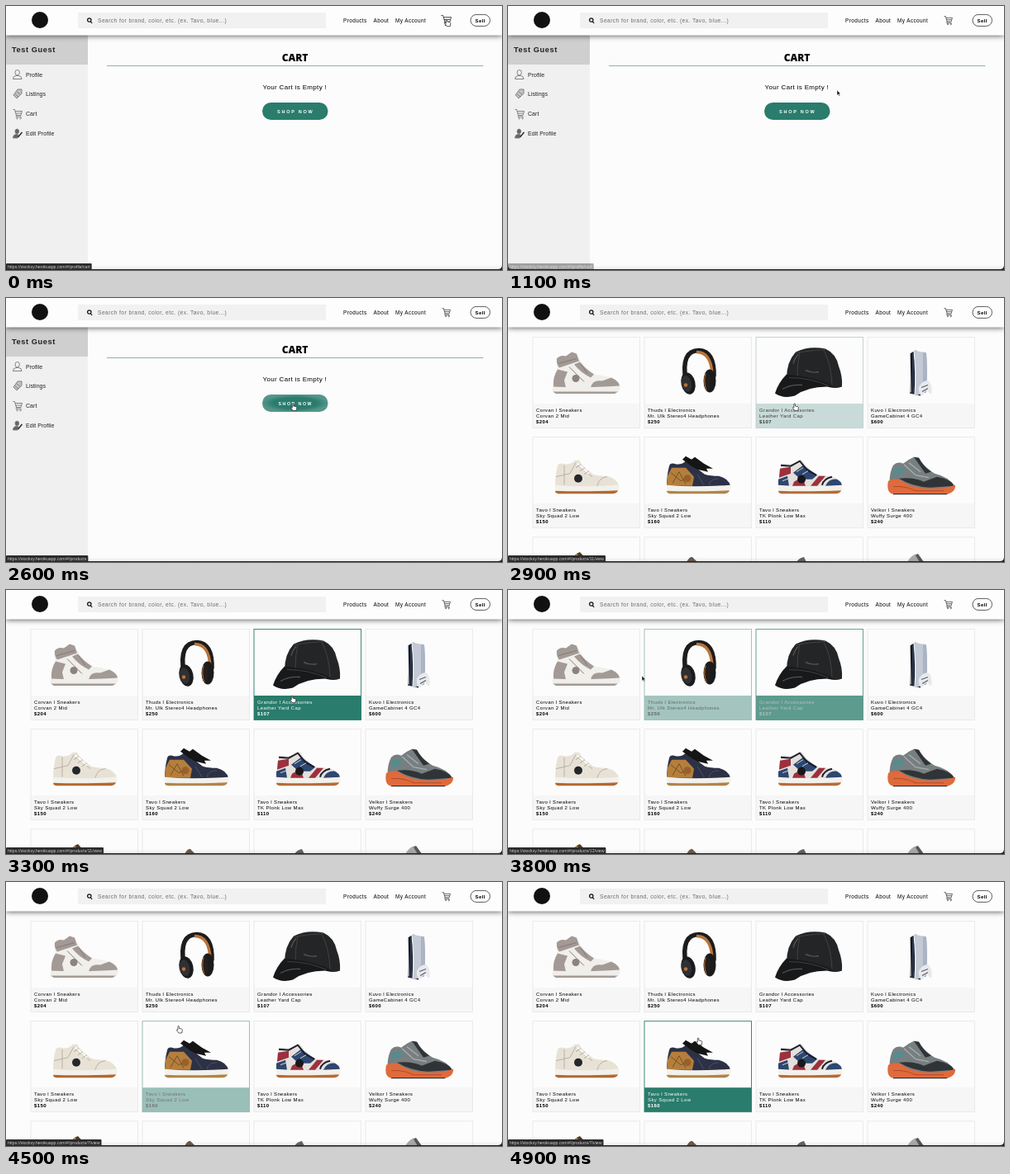
Write an HTML page that moves like this. It is 600 px wide and 320 px high and loops after 5000 ms.

```html
<!DOCTYPE html>
<html lang="en">
<head>
<meta charset="utf-8">
<title>Shop cart</title>
<style>
  html, body { margin: 0; width: 100%; height: 100%; overflow: hidden; background: #fcfcfc; }
  svg { display: block; width: 600px; height: 320px; font-family: "Liberation Sans", Arial, sans-serif; }
  .bold { font-weight: bold; }
  .search { font-size: 6.7px; letter-spacing: .43px; fill: #6c6c6c; }
  .nav { font-size: 6.4px; letter-spacing: .42px; }
  .user { font-size: 9.3px; letter-spacing: .55px; fill: #222; }
  .menu { font-size: 7px; letter-spacing: .04px; fill: #222; }
  .title { font: 800 12px "Open Sans", "Noto Sans", sans-serif; font-stretch: 75%; }
  .empty { font-size: 8px; letter-spacing: .34px; }
  .card { font-size: 6px; letter-spacing: .38px; }
  .status { font-size: 5.2px; fill: #d0d0d0; }
  .line { fill: none; stroke: #333; stroke-width: .8; stroke-linejoin: round; }
  .icon { fill: none; stroke: #777; stroke-width: .9; }
  #header { filter: drop-shadow(0 1.5px 3px rgba(0, 0, 0, .6)); }
</style>
</head>
<body>
<svg viewBox="0 0 600 320">
  <defs>
    <path id="trolley" d="M0 .5H2L4 7.5H9.5L11 2.5H2.6M3 5H10M4 7.5L3.5 9H10M5 10.2a.8.8 0 1 0 .1 0M9 10.2a.8.8 0 1 0 .1 0"/>
    <radialGradient id="glow">
      <stop offset=".65" stop-color="#fff" stop-opacity="0"/>
      <stop offset="1" stop-color="#fff" stop-opacity=".2"/>
    </radialGradient>
    <linearGradient id="floor" x2="0" y2="1">
      <stop stop-opacity="0"/>
      <stop offset="1" stop-opacity=".06"/>
    </linearGradient>
  </defs>
  <rect width="600" height="320" fill="#fcfcfc"/>

  <g id="cartPage">
    <rect y="35" width="99" height="285" fill="#f0f0f0"/>
    <rect y="35" width="99" height="36" fill="#cfcfcf"/>
    <text class="user bold" x="7" y="56">Test Guest</text>
    <g class="menu">
      <text x="24" y="85.5">Profile</text>
      <text x="24" y="109.2">Listings</text>
      <text x="24" y="133">Cart</text>
      <text x="24" y="156.8">Edit Profile</text>
    </g>
    <g class="icon">
      <path d="M11 80.5a2.7 3 0 1 1 5.4 0a2.7 3.4 0 1 1-5.4 0M8.5 88.5Q8.5 85 12 84.5H15.5Q19 85 19 88.5Z"/>
      <path d="M9 108L14 101L19 101V106L13 112ZM11 107L15 110M13 104L17 107" fill="#c4c4c4"/>
      <use href="#trolley" x="8.5" y="125"/>
      <path d="M8.5 160Q8.5 156 12 155.5L15 156L14 160ZM11 152a2.3 2.8 0 1 1 4.6 0a2.3 2.8 0 1 1-4.6 0" fill="#666"/>
      <path d="M14.5 159L19.5 153" stroke="#333" stroke-width="1.6"/>
    </g>
    <text class="title" x="349.5" y="67.4" text-anchor="middle">CART</text>
    <path d="M122 72.5H577.5" stroke="#8bb5ad"/>
    <text class="empty" x="310.5" y="101.3">Your Cart is Empty !</text>
    <rect x="310" y="117" width="79.5" height="21" rx="10.5" fill="#2a7c6c"/>
    <rect id="buttonGlow" x="310" y="117" width="79.5" height="21" rx="10.5" fill="url(#glow)"/>
    <text id="buttonText" class="bold" y="129.7" fill="#fff">SHOP NOW</text>
  </g>

  <g id="shopPage"></g>

  <rect id="header" width="600" height="35.5" fill="#fdfdfd"/>
  <circle cx="41" cy="17" r="10" fill="#111"/>
  <rect x="87" y="8" width="300" height="19" fill="#f1f1f1"/>
  <path d="M102.2 18.8L104.2 20.8M98.6 17a2.2 2.2 0 1 1 4.4 0a2.2 2.2 0 1 1-4.4 0" fill="none" stroke="#111" stroke-width="1.2"/>
  <text class="search" x="111" y="19.8">Search for brand, color, etc. (ex. Tavo, blue...)</text>
  <g class="nav">
    <text x="408" y="19.6">Products</text>
    <text x="444.5" y="19.6">About</text>
    <text x="471" y="19.6">My Account</text>
    <text class="bold" x="567.5" y="19.5" style="font-size:6px">Sell</text>
  </g>
  <rect class="line" x="562" y="10.4" width="23.5" height="14" rx="7"/>
  <g id="navCart"><use class="line" href="#trolley" x="-5.5" y="-6"/></g>

  <rect y="314" width="600" height="5" fill="url(#floor)"/>
  <path d="M0 314Q0 319 5 319H595Q600 319 600 314V320H0Z" fill="#222"/>
  <g id="status">
    <rect y="312" height="8" rx="1" fill="#2b2b2b"/>
    <text class="status" x="2" y="317.9"></text>
  </g>
  <g id="cursor">
    <path id="arrow" d="M0 0V6.3L1.5 5L2.5 7.2L3.5 6.7L2.5 4.6H4.4Z" fill="#111" stroke="#fff" stroke-width=".5"/>
    <path id="hand" d="M0 0Q.8 0 .8 .9V3L4 3.7Q4.9 4 4.8 5.2L4.2 8.6H.4L-2 5.4Q-2.2 4.4-1.3 4.5L-.7 5V.9Q-.7 0 0 0Z" fill="#fff" stroke="#222" stroke-width=".7"/>
  </g>
</svg>
<script>
const $ = id => document.getElementById(id);
const shape = (fill, d) => `<path fill="${fill}" d="${d}"/>`;
const stroke = (color, width, d) => `<path fill="none" stroke="${color}" stroke-width="${width}" d="${d}"/>`;
const disc = (x, y, r, fill) => `<circle cx="${x}" cy="${y}" r="${r}" fill="${fill}"/>`;

const lowShoe = (upper, outsole, details) =>
  shape(upper, 'M30 35Q31 31 36 32Q44 35 51 28L56 28Q60 36 73 45Q80 47 90 47Q102 50 104 59V61H27Q27 46 30 35Z') + details +
  shape('#f3f1ec', 'M27 58Q60 61 104 58Q106 63 102 66H30Q26 64 27 58Z') +
  shape(outsole, 'M27 65Q60 66.5 103 64.5Q102 68 97 68.5H31Q27 68 27 65Z');

const midShoe =
  shape('#f1efec', 'M29 26Q33 21 40 23L47 18L53 20Q58 33 74 45Q84 46 95 49Q106 54 105 61H25Q24 48 30 39Q28 32 29 26Z') +
  shape('#a39a95', 'M29 26Q33 21 40 23L47 18L53 20L56 29L32 37Q28 32 29 26ZM30 39L42 42L38 52L40 61H25Q24 48 30 39ZM50 33L57 30Q63 38 74 45L70 49Q58 43 50 33ZM70 61Q72 51 84 53L95 49Q106 54 105 61Z') +
  stroke('#857b76', 1, 'M31 32L53 26M44 36L62 54M58 32L66 44') +
  disc(52, 50, 4.5, '#8d837e') +
  shape('#f0eeea', 'M24 60Q60 62 105 59Q107 64 102 67H28Q22 66 24 60Z') +
  shape('#a39a95', 'M24 66H103L99 68.5H28Z');

const headphones =
  stroke('#1d1c1d', 5.5, 'M50 52Q44 16 66 16Q85 17 84 48') +
  stroke('#b9743a', 3.5, 'M63 18Q81 18 82 46') +
  '<g transform="rotate(-12 53 56)"><ellipse cx="53" cy="56" rx="8.5" ry="13.5" fill="#1b1b1d"/><ellipse cx="51" cy="56" rx="6" ry="10" fill="#303033"/></g>' +
  '<ellipse cx="79" cy="53" rx="7.5" ry="14" fill="#1b1b1d"/><ellipse cx="76" cy="54" rx="4" ry="11" fill="#241f1d"/>' +
  stroke('#b9743a', 1, 'M74 44Q71 54 75 65') +
  disc(50, 58, 2.2, '#b9743a');

const cap =
  shape('#242526', 'M37 50Q37 30 48 18Q64 10 84 14Q97 20 100 35Q105 48 104 60Q95 63 88 60Q70 55 37 50Z') +
  shape('#18191a', 'M37 45Q27 55 23 68Q33 75 47 71Q62 60 86 60Q92 62 93 59Q72 48 37 45Z') +
  stroke('#47494b', .8, 'M48 19Q64 16 84 15M53 18Q50 32 50 47M82 16Q91 32 92 58M40 49Q66 49 88 59') +
  stroke('#505254', 1.4, 'M32 63Q42 57 56 58M45 32Q47 25 51 21M60 40Q68 44 76 42');

const gameBox =
  shape('#17191f', 'M51 20L58 16L64 20V71L51 68Z') +
  shape('#c3cad5', 'M56 16L71 19Q73 44 71 67L57 71Q59 44 56 16Z') +
  shape('#aab4c3', 'M67 18L71 19Q73 44 71 67L67 68Z') +
  stroke('#eceff3', 1.3, 'M56 16Q59 44 57 71M51 19L52 67') +
  stroke('#4b78b6', .7, 'M55 20V68') +
  shape('#e7e9ed', 'M62 60Q69 50 75 54Q79 60 77 69Q74 68 72 64Q68 66 66 71Q61 69 62 60Z') +
  stroke('#5a5f69', 1.2, 'M65 61L73 58M66 66L73 62');

const creamShoe = lowShoe('#e8e2d6', '#b4682f',
  stroke('#b9b1a2', 1, 'M52 31L45 44L28 48M54 34L72 48M78 59Q80 49 90 48M38 34V58') +
  stroke('#fff', 2, 'M54 32L68 44') +
  stroke('#8d8678', .6, 'M52 37L58 33M57 41L63 37M62 45L68 41') + disc(55, 50, 5, '#24262a'));
const patchShoe = lowShoe('#2d3146', '#b08448',
  shape('#b47f3c', 'M28 47L33 37L50 37L60 48L58 59H27Z') +
  stroke('#765128', 1, 'M32 43L44 53L55 48M34 56L42 42L50 57') +
  stroke('#4b5065', 1, 'M64 45L72 58M78 58Q80 50 90 50') + disc(52, 50, 4.5, '#98602c') +
  shape('#151516', 'M46 27L50 23L57 27L61 24L72 32L83 38L75 38L77 42L64 39L57 35Z'));
const paintShoe = lowShoe('#e4e0dc', '#b56c38',
  shape('#9d303c', 'M29 38L42 36L42 44L28 49ZM76 47L84 47L74 59H66ZM46 54L56 48L60 59H44Z') +
  shape('#2d4770', 'M45 43L57 34L74 46L68 51H54ZM27 51L38 47L40 59H27ZM84 59Q88 50 98 51Q104 54 104 59Z') +
  stroke('#1b1e2c', 2, 'M30 34L42 35L53 29L62 40L73 46M80 58Q82 50 92 48') +
  stroke('#e6e2dd', .9, 'M49 42L57 37M56 45L63 41M32 53L40 50') + disc(55, 51, 5, '#17181c'));
const runner =
  shape('#777f81', 'M31 34Q36 29 43 32Q49 27 56 24L62 25Q68 36 81 44Q98 48 105 59L102 63H27Q25 45 31 34Z') +
  shape('#303437', 'M56 24L62 25Q67 35 77 42L70 44ZM38 50Q56 48 68 54L84 48Q101 51 105 59L76 61Q54 60 38 50Z') +
  shape('#4f8e92', 'M31 39L42 37L44 42L32 46Z') +
  stroke('#a9b0b0', 1.2, 'M44 33L58 46L74 49M50 31L64 42') +
  shape('#df6a3c', 'M25 53Q36 48 43 54Q54 61 72 62Q92 63 106 58Q107 66 97 69H31Q22 67 25 53Z') +
  stroke('#3a3432', 1.3, 'M31 69H96') + stroke('#b64b27', 1.1, 'M31 60Q46 59 58 65H92');

const peeks = [
  shape('#4a3a2b', 'M46 30Q50 20 57 18L68 30Z') + shape('#b08a4c', 'M46 30Q50 21 54 20L58 30Z'),
  shape('#6b5b50', 'M51 30Q55 23 58 24L64 30Z'),
  shape('#62656b', 'M49 30Q52 25 58 24L61 30Z'),
  shape('#a8aaab', 'M48 30Q53 21 60 20L68 30Z') + shape('#55585b', 'M58 22L61 20L68 30H63Z')
];

const products = [
  ['Corvan l Sneakers', 'Corvan 2 Mid', '$204', midShoe],
  ['Thuds l Electronics', 'Mr. Ulk Stereo4 Headphones', '$250', headphones],
  ['Grandor l Accessories', 'Leather Yard Cap', '$107', cap],
  ['Kuvo l Electronics', 'GameCabinet 4 GC4', '$600', gameBox],
  ['Tavo l Sneakers', 'Sky Squad 2 Low', '$150', creamShoe],
  ['Tavo l Sneakers', 'Sky Squad 2 Low', '$160', patchShoe],
  ['Tavo l Sneakers', 'TK Plonk Low Max', '$110', paintShoe],
  ['Velkor l Sneakers', 'Wuffy Surge 400', '$240', runner],
  ...peeks.map(art => ['', '', '', art])
];

$('shopPage').innerHTML = products.map(([brand, name, price, art], i) => `
  <g class="card" transform="translate(${30 + i % 4 * 135} ${47.5 + Math.floor(i / 4) * 121.2})">
    <rect class="info" y="80.5" width="129.5" height="29.5"/>
    ${art}
    <rect class="frame" width="129.5" height="110" fill="none" stroke-width=".9"/>
    <g class="label">
      <text x="4" y="90.2">${brand}</text><text x="4" y="97.4">${name}</text>
      <text class="bold" x="4" y="104.6">${price}</text>
    </g>
  </g>`).join('');
const cards = [...document.querySelectorAll('g.card')];

// Keys are [time, ...values], joined linearly.
function track(keys, t) {
  const i = keys.findIndex(k => k[0] > t);
  if (i < 1) return keys.at(i).slice(1);
  const [a, b] = [keys[i - 1], keys[i]];
  const u = (t - a[0]) / (b[0] - a[0]);
  return a.slice(1).map((v, j) => v + (b[j + 1] - v) * u);
}
const mix = (a, b, u) => `rgb(${a.map((v, i) => Math.round(v + (b[i] - v) * u))})`;

const LOOP = 5000, STEP = 100, SHOP_AT = 2800;
const TEAL = [42, 124, 108];
const cursorPath = [
  [0, 533, 16], [700, 533, 16], [900, 459, 66], [1100, 398, 102], [1200, 389, 106],
  [1850, 351, 127], [2400, 351, 127], [2600, 347, 128], [3300, 346, 128], [3600, 310, 122],
  [3800, 162, 104], [4250, 162, 104], [4450, 205, 172], [4800, 230, 189]
];
const hovers = {
  1: [[0, 0], [3650, 0], [3800, .4], [4100, 0]],
  2: [[0, 0], [2800, 0], [2900, .22], [3000, .62], [3300, 1], [3680, 1], [3800, .75], [3900, .32], [4150, 0]],
  5: [[0, 0], [4350, 0], [4450, .25], [4550, .65], [4850, 1]]
};
// [start, path, fade-out start, fade-out end]
const links = [
  [0, 'profile/cart', 950, 1200], [2200, 'products', 2700, 2750],
  [2800, 'products/11/view', 3700, 3701], [3700, 'products/12/view', 4050, 4350],
  [4400, 'products/7/view', 5000, 5001]
];

function setText(el, size, spacing) {
  el.style.fontSize = size + 'px';
  el.style.letterSpacing = spacing + 'px';
}

function draw(t) {
  const shop = t >= SHOP_AT;
  $('cartPage').style.display = shop ? 'none' : '';
  $('shopPage').style.display = shop ? '' : 'none';

  const [press] = track([[0, 0], [1800, 0], [2100, 1]], t);
  $('buttonGlow').style.opacity = press;
  $('buttonText').setAttribute('x', 328 + 1.5 * press);
  setText($('buttonText'), 5.5 - .3 * press, 1.75 - .15 * press);

  const [zoom] = track([[0, 1.1], [700, 1.1], [900, .9]], t);
  $('navCart').setAttribute('transform', `translate(532.5 17.5) scale(${zoom})`);

  cards.forEach((card, i) => {
    const u = hovers[i] ? track(hovers[i], t)[0] : 0;
    card.querySelector('.info').style.fill = mix([246, 246, 246], TEAL, u);
    card.querySelector('.frame').style.stroke = mix([232, 232, 232], TEAL, u);
    card.querySelector('.label').style.fill = mix([0, 0, 0], [255, 255, 255], u);
  });

  const [, path, fadeStart, fadeEnd] = links.findLast(link => link[0] <= t);
  const [bar, label] = $('status').children;
  label.textContent = 'https://stockxy.herokuapp.com/#/' + path;
  bar.setAttribute('width', label.getComputedTextLength() + 4);
  $('status').style.opacity = track([[fadeStart, 1], [fadeEnd, 0]], Math.max(t, fadeStart))[0];

  const [x, y] = track(cursorPath, t);
  const pointing = t < 750 || (t >= 1850 && t < 3750) || t >= 4400;
  $('cursor').setAttribute('transform', `translate(${x} ${y})`);
  $('hand').style.display = pointing ? '' : 'none';
  $('arrow').style.display = pointing ? 'none' : '';
}

const start = performance.now();
function tick() {
  const t = (performance.now() - start) % LOOP;
  draw(Math.floor(t / STEP) * STEP);
  requestAnimationFrame(tick);
}
tick();
</script>
</body>
</html>
```
